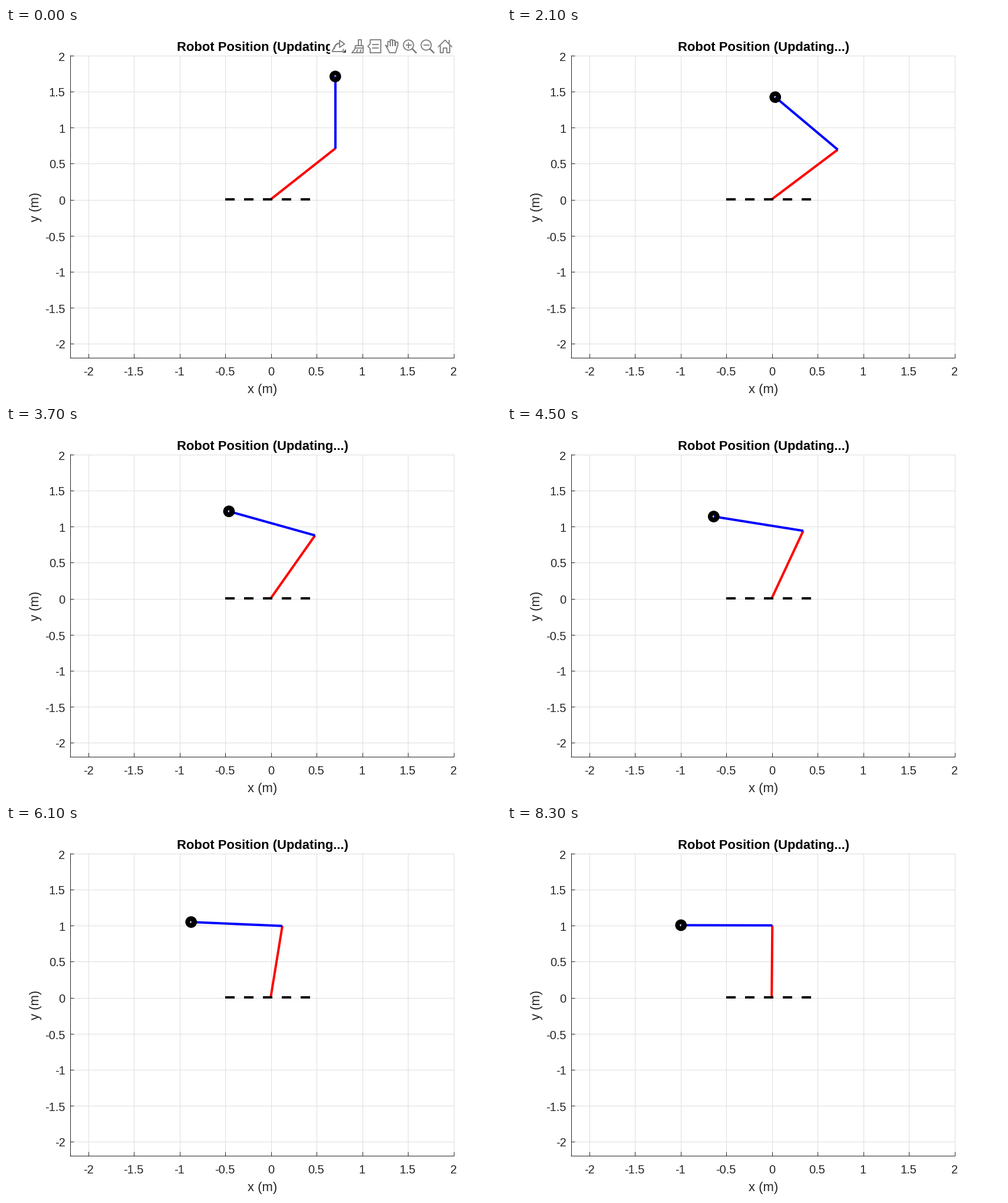
A matplotlib script for the animation above (8.35 s loop, 840x630 px).

```python
import numpy as np
import matplotlib.pyplot as plt
from matplotlib.animation import FuncAnimation
from matplotlib.patches import Arc, Circle, Polygon, Rectangle

W, H, DPI = 840, 630, 100
PT = 72 / DPI  # points per pixel
INTERVAL, FRAMES, HOLD = 50, 167, 6
INK, GRID, ICON = "#262626", "#dedede", "#7c7c7c"

plt.rcParams["font.family"] = "Liberation Sans"

fig = plt.figure(figsize=(W / DPI, H / DPI), dpi=DPI, facecolor="white")
ax = fig.add_axes([0, 0, 1, 1])
ax.set_xlim(0, W)
ax.set_ylim(H, 0)
ax.axis("off")


def px(x):
    return 449.2 + 155 * x


def py(y):
    return 291.0 - 122.25 * y


def snap(v):
    return np.floor(v) + 0.5


def line(xs, ys, color, width, z=1):
    return ax.plot(xs, ys, color=color, lw=width * PT, zorder=z,
                   solid_capstyle="butt", solid_joinstyle="miter")[0]


def label(x, y, text, size, **kw):
    kw = {"color": INK, "ha": "center", "va": "baseline", **kw}
    ax.text(x, y, text, fontsize=size * PT, **kw)


# Axes, grid and labels
left, right = snap(px(-2.2)), snap(px(2))
top, bottom = snap(py(2)), snap(py(-2.2))
for v in np.arange(-2, 2.5, 0.5):
    gx, gy = snap(px(v)), snap(py(v))
    line([gx, gx], [top, bottom], GRID, 1)
    line([left, right], [gy, gy], GRID, 1)
    line([gx, gx], [bottom, bottom - 6.5], INK, 1, 2)
    line([left, left + 6.5], [gy, gy], INK, 1, 2)
    label(gx, 590, f"{v:g}", 20)
    label(100.5, gy + 9, f"{v:g}", 20, ha="right")
line([left, left], [top - 0.5, bottom + 0.5], INK, 1, 2)
line([left - 0.5, right + 0.5], [bottom, bottom], INK, 1, 2)

label(435, 620, "x (m)", 22)
label(56, 304, "y (m)", 22, rotation=90, rotation_mode="anchor")
label(435, 39, "Robot Position (Updating...)", 22, color="black", weight="bold")

# Arm, base and end effector
lower = line([], [], "red", 4, 4)
upper = line([], [], "blue", 4, 5)
for k in range(5):
    x = px(-0.5) + 32.1 * k
    line([x, x + 16], [py(0), py(0)], "black", 4, 6)
tip = Circle((0, 0), 5.9, fill=False, ec="black", lw=7.9 * PT, zorder=7)
ax.add_patch(tip)

# Toolbar
toolbar = []


def add(patch, z=11):
    patch.set_zorder(z)
    toolbar.append(ax.add_patch(patch))


def stroke(*points, closed=False, width=1.8):
    add(Polygon(points, closed=closed, fill=False, ec=ICON, lw=width * PT,
                joinstyle="round", capstyle="round"))


def draw_share():
    stroke((557, 33), (553.5, 40), (571, 40), (573, 36))
    stroke((566, 21), (574.5, 27), (566, 33), closed=True)
    add(Arc((566, 36), 18, 20, theta1=180, theta2=270, ec=ICON, lw=2.4 * PT))
    add(Polygon([(577, 36), (577, 42), (571, 42)], fc="#4a4a4a", ec="none"))


def draw_brush():
    stroke((598, 30), (598, 20), (603, 20), (603, 30))
    stroke((593, 30), (606, 30), (606, 42), (587, 42), (592, 36), closed=True)
    stroke((593, 34), (606, 34))
    for x in (595, 601):
        stroke((x, 41), (x + 1.5, 37))


def draw_data_tip():
    stroke((618, 35), (614, 31), (618, 27), (618, 20), (636, 20), (636, 42),
           (618, 42), closed=True)
    for y in (28, 34):
        stroke((622, y), (632, y))


def draw_hand():
    for k in range(4):
        x = 648 + 4.2 * k
        tall = 20 + 1.5 * (k - 1.3) ** 2
        stroke((x, 30), (x, tall), (x + 4, tall), (x + 4, 30))
    stroke((648, 32), (644, 29), (651, 42), (661, 42), (664.5, 30))


def draw_zoom(cx, plus):
    add(Circle((cx, 29), 8.6, fill=False, ec=ICON, lw=1.8 * PT))
    stroke((cx + 6.5, 35.5), (cx + 13, 42), width=2.6)
    stroke((cx - 4.5, 29), (cx + 4.5, 29))
    if plus:
        stroke((cx, 24.5), (cx, 33.5))


def draw_home():
    stroke((733.5, 32), (745, 20.5), (756.5, 32))
    stroke((737, 30), (737, 42), (742, 42), (742, 34), (748, 34), (748, 42),
           (753, 42), (753, 30))
    stroke((752, 26), (752, 21))


add(Rectangle((550, 18), 210, 28, fc="white", ec="none"), 10)
draw_share()
draw_brush()
draw_data_tip()
draw_hand()
draw_zoom(683, True)
draw_zoom(713, False)
draw_home()

# Motion: the tip runs from START to GOAL on a slightly sagging line
START = np.array([np.sqrt(0.5), 1 + np.sqrt(0.5)])
GOAL = np.array([-1.0, 1.0])
LAG, RATE, POWER, SAG = 5.5, 0.0057, 2.6, 0.11


def progress(step):
    """Soft start, then a long ease out."""
    run = step - LAG * (1 - np.exp(-step / LAG))
    return 1 - (1 - RATE * run) ** POWER


def pose(step):
    """Elbow and tip, with both links one metre long."""
    s = progress(step)
    tx, ty = START + s * (GOAL - START)
    ty -= SAG * s * s * (1 - s)
    angle = np.arctan2(ty, tx) - np.arccos(np.hypot(tx, ty) / 2)
    return np.cos(angle), np.sin(angle), tx, ty


def update(frame):
    step = max(0, frame - HOLD)
    ex, ey, tx, ty = pose(step)
    lower.set_data([px(0), px(ex)], [py(0), py(ey)])
    upper.set_data([px(ex), px(tx)], [py(ey), py(ty)])
    tip.center = px(tx), py(ty)
    for part in toolbar:
        part.set_visible(step == 0)
    return [lower, upper, tip, *toolbar]


anim = FuncAnimation(fig, update, frames=FRAMES, interval=INTERVAL,
                     repeat=True, repeat_delay=0, blit=False)
plt.show()
```
